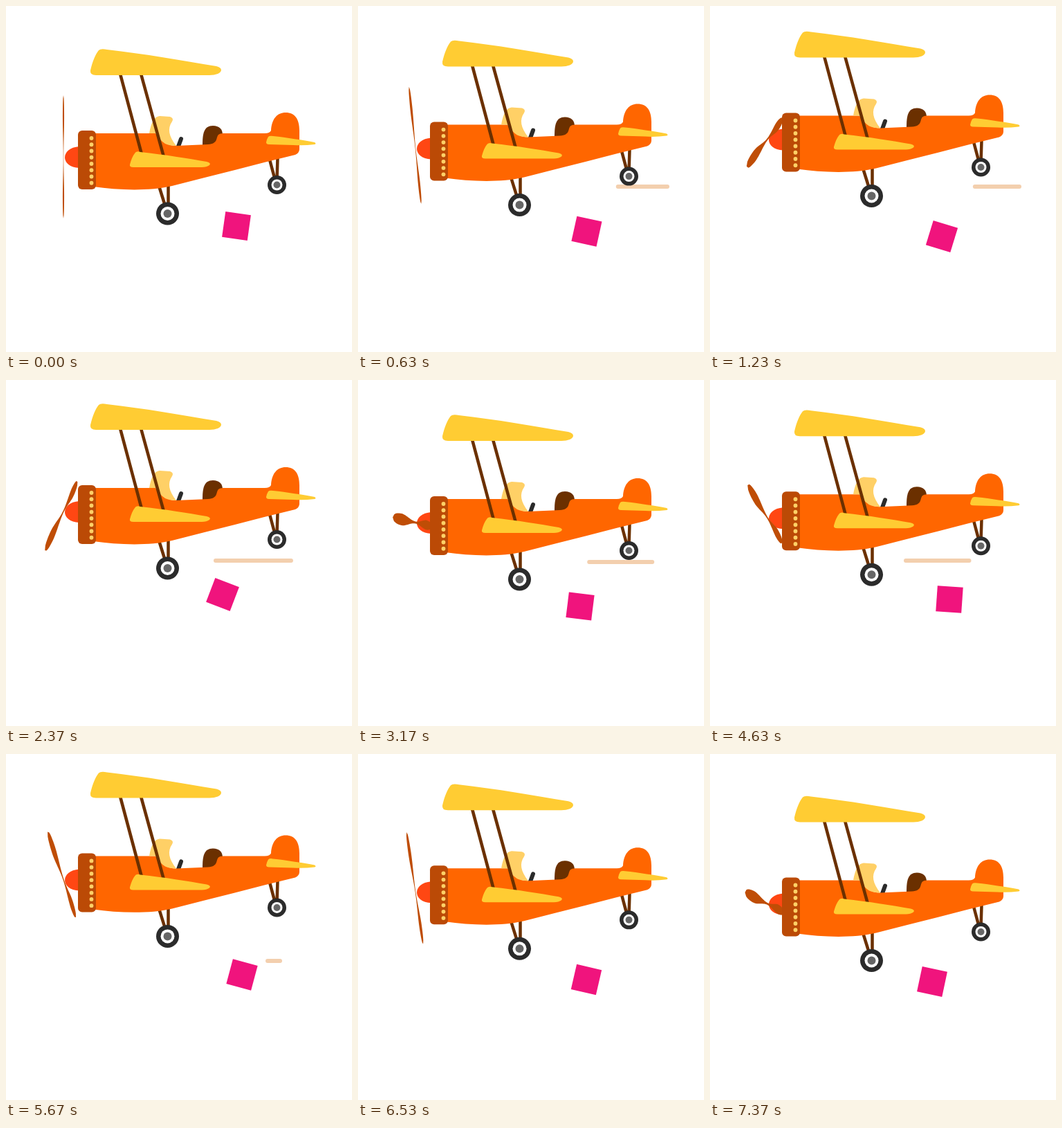
An HTML page for the animation above (7410 ms loop, 500 by 500 pixels).

```html
<!DOCTYPE html>
<html lang="en">
<head>
<meta charset="utf-8">
<title>Biplane</title>
<style>
  html, body { margin: 0; width: 100%; height: 100%; overflow: hidden; background: #fff; }
  svg { display: block; width: 100%; height: 100%; }
</style>
</head>
<body>
<svg viewBox="0 0 500 500">
  <g id="streaks" fill="#f3cfae"></g>
  <rect id="tag" x="-18.5" y="-18.5" width="37" height="37" fill="#f0147d"/>
  <g id="plane">
    <g stroke="#6b3000" stroke-width="4.5">
      <path d="M221 260L231 292M234.500 258V292M381 222L389 252M392.500 220L391.500 252"/>
    </g>
    <g id="wheels"></g>
    <path d="M284 201C284 184 286 173 299 173C308 173 313 178 313 186L300 203Z" fill="#6b3000"/>
    <path d="M249 203L253 192" stroke="#2b2b2b" stroke-width="6" stroke-linecap="round"/>
    <path fill="#ff6600" d="M126 184H216C224 196 234 202 246 202L292 200C307 199 303 190 307 186Q309 184 314 184H374Q381 184 383 180C384 163 392 154 404 154C418 154 424 164 424 180V207Q424 212 418 215C360 229 300 245 240 260C205 268 162 266 126 261Z"/>
    <path fill="#ffd066" d="M207 184C210 168 214 160 222 159L237 160Q243 162 240 167C233 177 235 188 246 202Q236 202 230 199Q222 194 217 184Z"/>
    <path d="M165 98L196 214M195 98L228 218" stroke="#6b3000" stroke-width="4.600"/>
    <g fill="#ffcc33">
      <path d="M122 93C125 80 129 70 134 64Q137 61 146 63C200 69 255 79 304 87C313 89 313 95 306 98Q301 100 294 100H130Q121 100 122 93Z"/>
      <path d="M179 229Q182 218 186 213Q188 209 194 211C230 215 262 220 290 225Q297 227 294 230Q290 233 283 233H184Q178 233 179 229Z"/>
      <path d="M376 197Q377 192 379 189Q381 187 386 188C405 190 430 194 446 197Q449 199 446 200Q430 202 415 201L380 200Q376 200 376 197Z"/>
    </g>
    <path d="M106 203C78 205 78 233 106 234Z" fill="#ff4713"/>
    <path id="propeller" fill="#bf4d06"/>
    <rect x="104" y="180" width="26" height="85" rx="6" fill="#bb4a06"/>
    <g id="rivets" fill="#ffd066"></g>
  </g>
</svg>
<script>
const LOOP = 7410, TICK = 100 / 3, LAST_TICK = 221, HALF_LOOP = 111;
const $ = id => document.getElementById(id);

// Keys are [tick, value, ...]
const LIFT = [[0, 0], [23, 15], [37, 25.5], [46, 32], [57, 38], [71, 28], [95, 12], [110, 1.5], [111, 0]];
const SPIN = [[0, 90], [37, 2858], [71, 5367], [95, 7204], [139, 10467], [170, 12823], [221, 16749]];
const SWAY = [
  [0, 333, 318, 8], [15, 330, 325, 12], [37, 335, 333, 17], [71, 313, 310, 21],
  [84, 316, 327, 12], [95, 321, 327, 7], [123, 335, 330, 6], [139, 346, 317, 4],
  [153, 344, 329, 10], [170, 341, 319, 15], [177, 338, 328, 14], [195, 330, 326, 13], [221, 321, 329, 12]
];
const SPEED = 11.7;
const STREAKS = [
  { y: 261, lo: 280, hi: 450, len: 110, start: 12.4 },
  { y: 261, lo: 280, hi: 450, len: 110, start: 31 },
  { y: 299, lo: 346, hi: 399, len: 110, start: 56.95 },
  { y: 261, lo: 280, hi: 440, len: 115, start: 59.03 },
  { y: 263, lo: 280, hi: 440, len: 97, start: 85.7 }
];

function add(parent, name, attrs) {
  const el = document.createElementNS("http://www.w3.org/2000/svg", name);
  for (const key in attrs) el.setAttribute(key, attrs[key]);
  return parent.appendChild(el);
}

function sample(keys, tick, ease = p => p) {
  let i = 1;
  while (i < keys.length - 1 && tick > keys[i][0]) i++;
  const a = keys[i - 1], b = keys[i];
  const p = ease((tick - a[0]) / (b[0] - a[0]));
  return a.slice(1).map((v, k) => v + (b[k + 1] - v) * p);
}

const smooth = p => p * p * (3 - 2 * p);

function wheel(cx, cy, radii) {
  ["#2b2b2b", "#fff", "#666"].forEach((fill, i) => add($("wheels"), "circle", { cx, cy, r: radii[i], fill }));
}

// Two-bladed disc, turned almost edge-on and seen in perspective
function propellerPath(degrees) {
  const R = 89, HUB_X = 83, HUB_Y = 218, DEPTH = 520, SQUASH = 0.31, STEPS = 20;
  const angle = degrees * Math.PI / 180, c = Math.cos(angle), s = Math.sin(angle);
  const thin = 1 - 0.55 * s ** 8;
  const project = (u, v) => {
    const x = -(u * c + v * s), y = -(u * s - v * c);
    const scale = DEPTH / (DEPTH + x * 0.95);
    return (HUB_X + x * SQUASH * scale).toFixed(2) + " " + (HUB_Y + y * scale).toFixed(2);
  };
  const halfWidth = u =>
    thin * (1.5 + 6.5 * Math.sin(Math.PI / 2 * Math.min(1, u / 0.7)) ** 2) * Math.sqrt(1 - u ** 6);
  return [1, -1].map(side => {
    const edges = [[], []];
    for (let i = 0; i <= STEPS; i++) {
      const u = i / STEPS, w = halfWidth(u);
      edges[0].push(project(side * u * R, w));
      edges[1].unshift(project(side * u * R, -w));
    }
    return "M" + edges.flat().join("L") + "Z";
  }).join("");
}

wheel(233.5, 300, [16.5, 10, 6]);
wheel(391.5, 258.5, [13.5, 8, 5]);
for (let i = 0; i < 8; i++) add($("rivets"), "circle", { cx: 123.5, cy: 191 + i * 9.25, r: 2.9 });
for (const streak of STREAKS) streak.el = add($("streaks"), "rect", { y: streak.y - 3, height: 6, rx: 3 });

function render(time) {
  const tick = Math.min(LAST_TICK, Math.floor((time + 3.4) / TICK));
  const phase = tick % HALF_LOOP;
  $("plane").setAttribute("transform", `translate(0 ${-sample(LIFT, phase)[0]})`);
  $("propeller").setAttribute("d", propellerPath(sample(SPIN, tick)[0]));

  const [x, y, tilt] = sample(SWAY, tick, smooth);
  $("tag").setAttribute("transform", `translate(${x} ${y}) rotate(${tilt})`);

  for (const { el, lo, hi, len, start } of STREAKS) {
    const head = hi - (phase - start) * SPEED;
    const left = Math.max(lo, head), right = Math.min(hi, head + len);
    el.setAttribute("x", left);
    el.setAttribute("width", Math.max(0, right - left));
  }
}

const origin = performance.now();
function loop() {
  render((performance.now() - origin) % LOOP);
  requestAnimationFrame(loop);
}
loop();
</script>
</body>
</html>
```
